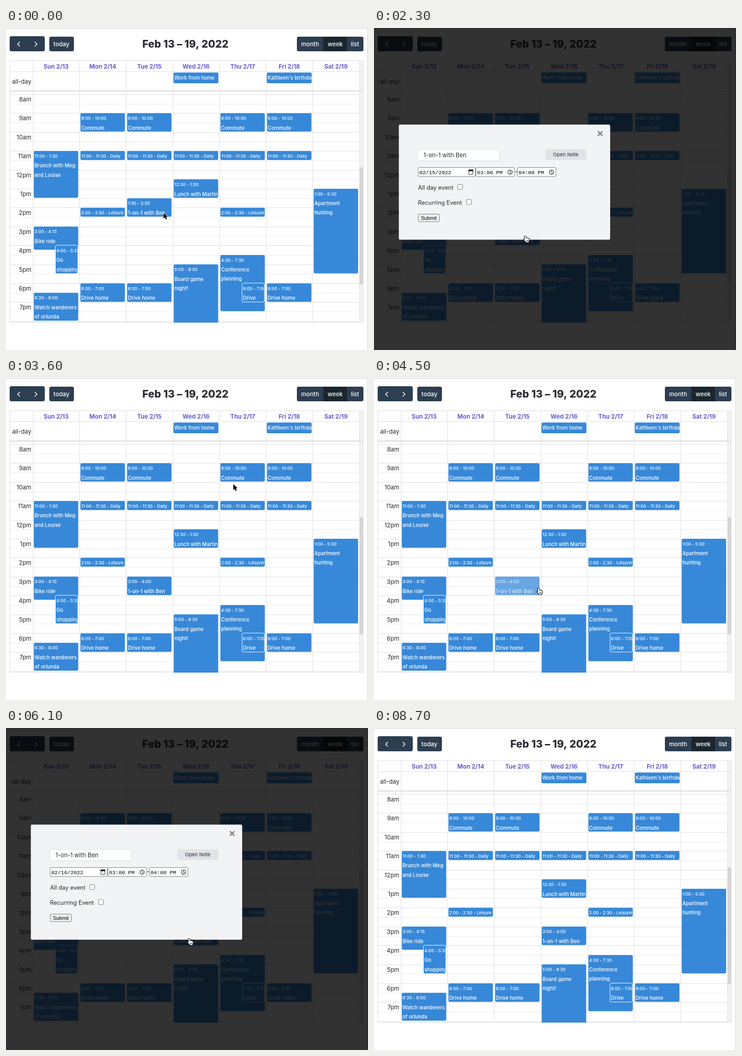
Animation of 794 by 705 pixels, one loop 8.8 s. Source, as an HTML page with a canvas:

```html
<!DOCTYPE html>
<html lang="en">
<head>
<meta charset="utf-8">
<title>Week calendar</title>
<style>
html, body { margin: 0; width: 100%; height: 100%; overflow: hidden; background: #fff; }
canvas { display: block; }
</style>
</head>
<body>
<canvas id="stage" width="794" height="705"></canvas>
<script>
const ctx = document.getElementById('stage').getContext('2d');
const LOOP = 8800, STEP = 100;
const SANS = 'Inter, sans-serif', MONO = '"Liberation Mono", monospace', UI = '"Liberation Sans", sans-serif';

const COLOR = {
  line: '#ddd', half: '#e9e9e9', gap: '#f0f0f0', track: '#f2f2f2', thumb: '#d6d6d6', edge: '#dedede',
  ink: '#24292f', title: '#2b2d33', day: '#6a5acd', button: '#2c3e50', active: '#1a252f',
  event: '#3788d8', white: '#fff', shade: 'rgba(0, 0, 0, 0.805)',
  modal: '#f1f3f5', cross: '#7d7f82', border: '#767676', icon: '#111'
};

const DAYS = ['Sun 2/13', 'Mon 2/14', 'Tue 2/15', 'Wed 2/16', 'Thu 2/17', 'Fri 2/18', 'Sat 2/19'];
const colX = d => 59 + 102.3 * d;
const hourY = h => 145 + 41.4 * (h - 8);
const clock = h => `${(Math.floor(h) + 11) % 12 + 1}:${String(h % 1 * 60).padStart(2, '0')}`;

// day, start, end, title lines, inset
const EVENTS = [
  ...[1, 2, 4, 5].map(d => [d, 9, 10, ['Commute']]),
  ...[1, 2, 3, 4, 5].map(d => [d, 11, 11.5, ['Daily']]),
  ...[1, 2, 5].map(d => [d, 18, 19, ['Drive home']]),
  [0, 11, 13.5, ['Brunch with Meg', 'and Louise']],
  [0, 15, 16.25, ['Bike ride']],
  [0, 16, 17.5, ['Go', 'shopping'], true],
  [0, 18.5, 20, ['Watch wanderers', 'of orlunda']],
  [1, 14, 14.5, ['Leisure']],
  [3, 12.5, 13.5, ['Lunch with Martin']],
  [3, 17, 20.5, ['Board game', 'night!']],
  [4, 14, 14.5, ['Leisurely']],
  [4, 16.5, 19.5, ['Conference', 'planning']],
  [4, 18, 19, ['Drive'], true],
  [6, 13, 17.5, ['Apartment', 'hunting']]
];
const MEETING = '1-on-1 with Ben';

// time, x, y, shape
const POINTER = [
  [0, 345, 404, 'arrow'], [100, 342, 405, 'hand'], [600, 342, 406, 'hand'], [1100, 329, 455, 'hand'],
  [1800, 329, 455, 'hand'], [1900, 328, 455, 'hand'], [2300, 328, 455, 'hand'],
  [2400, 331, 455, 'arrow'], [2600, 331, 455, 'arrow'], [3400, 499, 233, 'hand'], [3500, 498, 232, 'hand'],
  [3600, 498, 232, 'arrow'], [4300, 358, 459, 'hand'], [4400, 357, 460, 'hand'], [4500, 357, 460, 'hand'],
  [4600, 398, 461, 'hand'], [6300, 398, 461, 'hand'], [6400, 402, 460, 'arrow'], [6600, 402, 460, 'arrow'],
  [7100, 503, 231, 'arrow'], [7600, 503, 231, 'arrow'], [7700, 504, 229, 'arrow'], [7900, 504, 229, 'arrow'],
  [8000, 497, 231, 'hand'], [8400, 496, 229, 'hand'], [8500, 496, 229, 'arrow'], [8600, 496, 229, 'none']
];

function rect(x, y, w, h, fill) {
  ctx.fillStyle = fill;
  ctx.fillRect(x, y, w, h);
}

function box(x, y, w, h, r, fill, stroke) {
  ctx.beginPath();
  ctx.roundRect(x, y, w, h, r);
  ctx.fillStyle = fill;
  ctx.fill();
  if (stroke) {
    ctx.strokeStyle = stroke;
    ctx.lineWidth = 1;
    ctx.stroke();
  }
}

// y is the middle of the capitals
function text(str, x, y, size, color, { weight = 400, align = 'left', font = SANS } = {}) {
  ctx.font = `${weight} ${size}px ${font}`;
  ctx.textAlign = align;
  ctx.fillStyle = color;
  ctx.fillText(str, x, y + size * 0.36);
}

function path(points, color, width) {
  ctx.beginPath();
  points.forEach(([x, y]) => ctx.lineTo(x, y));
  ctx.strokeStyle = color;
  ctx.lineWidth = width;
  ctx.stroke();
}

function clipped(x, y, w, h, draw) {
  ctx.save();
  ctx.beginPath();
  ctx.rect(x, y, w, h);
  ctx.clip();
  draw();
  ctx.restore();
}

function toolbar() {
  const label = { weight: 500, align: 'center' };
  box(8, 18, 77, 33, 4, COLOR.button);
  path([[30.5, 30.5], [25.5, 35.5], [30.5, 40.5]], COLOR.white, 1.7);
  path([[63, 30.5], [68, 35.5], [63, 40.5]], COLOR.white, 1.7);
  box(95, 19, 54, 32, 4, COLOR.button);
  text('today', 121.5, 35, 13, COLOR.white, label);
  box(638, 19, 146, 32, 4, COLOR.button);
  rect(696, 19, 52, 32, COLOR.active);
  text('month', 667, 35, 13, COLOR.white, label);
  text('week', 722, 35, 13, COLOR.white, label);
  text('list', 765.5, 35, 13, COLOR.white, label);
  text('Feb 13 – 19, 2022', 393.5, 35, 22.75, COLOR.title, { weight: 800, align: 'center' });
}

function grid() {
  rect(775, 72, 9, 573, COLOR.track);
  for (let h = 8; h <= 20; h += 0.5) {
    const y = Math.round(hourY(h));
    rect(9, y, 765, 1, h % 1 ? COLOR.half : COLOR.line);
    if (h % 1 === 0 && h < 20) {
      text((h - 1) % 12 + 1 + (h < 12 ? 'am' : 'pm'), 55.5, y + 11, 13, COLOR.ink, { align: 'right' });
    }
  }
  rect(8, 136, 776, 4, COLOR.gap);
  for (const y of [71, 95, 136, 139, 644]) rect(8, y, 776, 1, COLOR.line);
  for (let d = 0; d < 8; d++) rect(Math.round(colX(d) - 0.4), 71, 1, 574, COLOR.line);
  rect(8, 71, 1, 574, COLOR.line);
  rect(783, 71, 1, 574, COLOR.line);
  DAYS.forEach((day, d) => text(day, colX(d) + 51, 84, 13, COLOR.day, { weight: 700, align: 'center' }));
  text('all-day', 55.5, 117, 13, COLOR.ink, { align: 'right' });
  box(775, 305, 8.5, 256, 2, COLOR.thumb);
}

function event([day, from, to, lines, inset], alpha = 1) {
  const x = colX(day) + (inset ? 50 : 2), w = inset ? 49 : 97.5;
  const y = hourY(from), h = hourY(to) - y - 1;
  const short = to - from < 1;
  ctx.globalAlpha = alpha;
  if (inset) box(x - 0.5, y - 0.5, w, h + 1, 3, COLOR.event, COLOR.white);
  else box(x, y, w, h, 3, COLOR.event);
  clipped(x, y, w - 1.5, h, () => {
    const time = `${clock(from)} - ${clock(to)}`;
    text(short ? `${time} - ${lines[0]}` : time, x + 1.6, y + 11.3, 9.39, COLOR.white, { weight: 500 });
    if (!short) lines.forEach((s, i) => text(s, x + 1.6, y + 32.3 + i * 20.2, 11.05, COLOR.white, { weight: 500 }));
  });
  ctx.globalAlpha = 1;
}

function allDay(day, title) {
  const x = colX(day) + 1.5;
  box(x, 97.5, 98.5, 23.5, 3, COLOR.event);
  clipped(x, 97, 98, 24, () => text(title, x + 1.8, 109.5, 11.05, COLOR.white, { weight: 500 }));
}

function meeting(t) {
  const start = t < 800 ? 13.5 : t < 1000 ? 14 : t < 1100 ? 14.5 : 15;
  const dragged = t >= 600 && t < 1600 || t >= 4500 && t < 5000;
  event([t < 4600 ? 2 : 3, start, start + 1, [MEETING]], dragged ? 0.75 : 1);
}

function page(t) {
  rect(0, 0, 794, 705, COLOR.white);
  rect(0, 0, 794, 1.5, COLOR.edge);
  rect(792.5, 0, 1.5, 705, COLOR.edge);
  toolbar();
  grid();
  allDay(3, 'Work from home');
  allDay(5, "Kathleen's birthday");
  clipped(8, 140, 767, 505, () => {
    EVENTS.forEach(e => event(e));
    meeting(t);
  });
}

function field(x, w, value) {
  box(x, 305.5, w, 19.5, 2, COLOR.white, COLOR.border);
  text(value, x + 2.5, 315.5, 11.7, '#000', { font: MONO });
}

function timeField(x, value) {
  field(x, 84.5, value);
  ctx.beginPath();
  ctx.arc(x + 75, 315.5, 4.7, 0, 7);
  ctx.strokeStyle = COLOR.icon;
  ctx.lineWidth = 1.2;
  ctx.stroke();
  path([[x + 75, 312.5], [x + 75, 315.7], [x + 77.3, 317]], COLOR.icon, 1.1);
}

function checkbox(label, x, y) {
  text(label, 96.5, y + 6.5, 12.8, COLOR.ink);
  box(x, y, 11, 11, 2, COLOR.white, COLOR.border);
}

function modal(t) {
  rect(0, 0, 794, 705, COLOR.shade);
  box(54.5, 211.5, 463.5, 252, 3, COLOR.modal);
  path([[491, 226], [501, 236]], COLOR.cross, 2.6);
  path([[501, 226], [491, 236]], COLOR.cross, 2.6);
  box(96.5, 266, 179, 24.5, 3, COLOR.white, '#d9dcdf');
  text(MEETING, 108.5, 278.5, 12.9, COLOR.ink);
  box(375.5, 265.5, 90, 23.5, 2, '#e1e3e8');
  text('Open Note', 420.5, 277.5, 11, COLOR.ink, { align: 'center' });
  field(97, 125.5, t < 4600 ? '02/15/2022' : '02/16/2022');
  box(208, 311, 9, 9.5, 1, COLOR.white, COLOR.icon);
  rect(207.5, 310.5, 10, 3, COLOR.icon);
  rect(209, 309, 1.5, 2, COLOR.icon);
  rect(214.5, 309, 1.5, 2, COLOR.icon);
  timeField(223.5, '03:00 PM');
  text('-', 308.8, 314.5, 13, COLOR.ink);
  timeField(314.5, '04:00 PM');
  checkbox('All day event', 183.5, 342.5);
  checkbox('Recurring Event', 202.5, 375.5);
  box(97, 407.5, 46.5, 16.5, 2, '#efefef', COLOR.border);
  text('Submit', 120.3, 416, 11.2, '#000', { font: UI, align: 'center' });
}

const ARROW = new Path2D('M.5 .5V13.2L3.4 10.5L5.5 15.2L8 14.1L5.9 9.6H10Z');
const HAND = new Path2D('M3.2 8.2L2 2.2Q1.9 .7 3.1 .6Q4.4 .5 4.7 1.8L5.6 5.2Q6.8 4.2 7.8 5.3Q9 4.6 9.9 5.8' +
  'Q11.6 5.3 12 7.2Q12.7 10 11.2 12.2V14H5V12.6Q2.6 10.6 .8 8.7Q.2 7.5 1.4 7.2Q2.3 7.2 3.2 8.2Z');

function pointer(t) {
  const i = POINTER.findLastIndex(k => k[0] <= t);
  const [t0, x0, y0, shape] = POINTER[i];
  if (shape === 'none') return;
  const [t1, x1, y1] = POINTER[i + 1];
  const u = (t - t0) / (t1 - t0), ease = u * u * (3 - 2 * u);
  const hand = shape === 'hand', outline = hand ? HAND : ARROW;
  ctx.save();
  ctx.translate(x0 + (x1 - x0) * ease, y0 + (y1 - y0) * ease);
  ctx.lineJoin = 'round';
  ctx.lineWidth = hand ? 2.2 : 1.8;
  ctx.strokeStyle = hand ? '#000' : '#fff';
  ctx.stroke(outline);
  ctx.fillStyle = hand ? '#fff' : '#000';
  ctx.fill(outline);
  if (hand) for (const x of [6.3, 8.2, 10]) path([[x, 9], [x, 12]], '#000', 0.8);
  ctx.restore();
}

const begin = performance.now();
function frame() {
  const now = Math.max(0, performance.now() - begin) % LOOP;
  const t = Math.floor(now / STEP) * STEP;
  page(t);
  if (t >= 2300 && t < 3600 || t >= 6100 && t < 8500) modal(t);
  pointer(t);
  requestAnimationFrame(frame);
}
frame();
</script>
</body>
</html>
```
